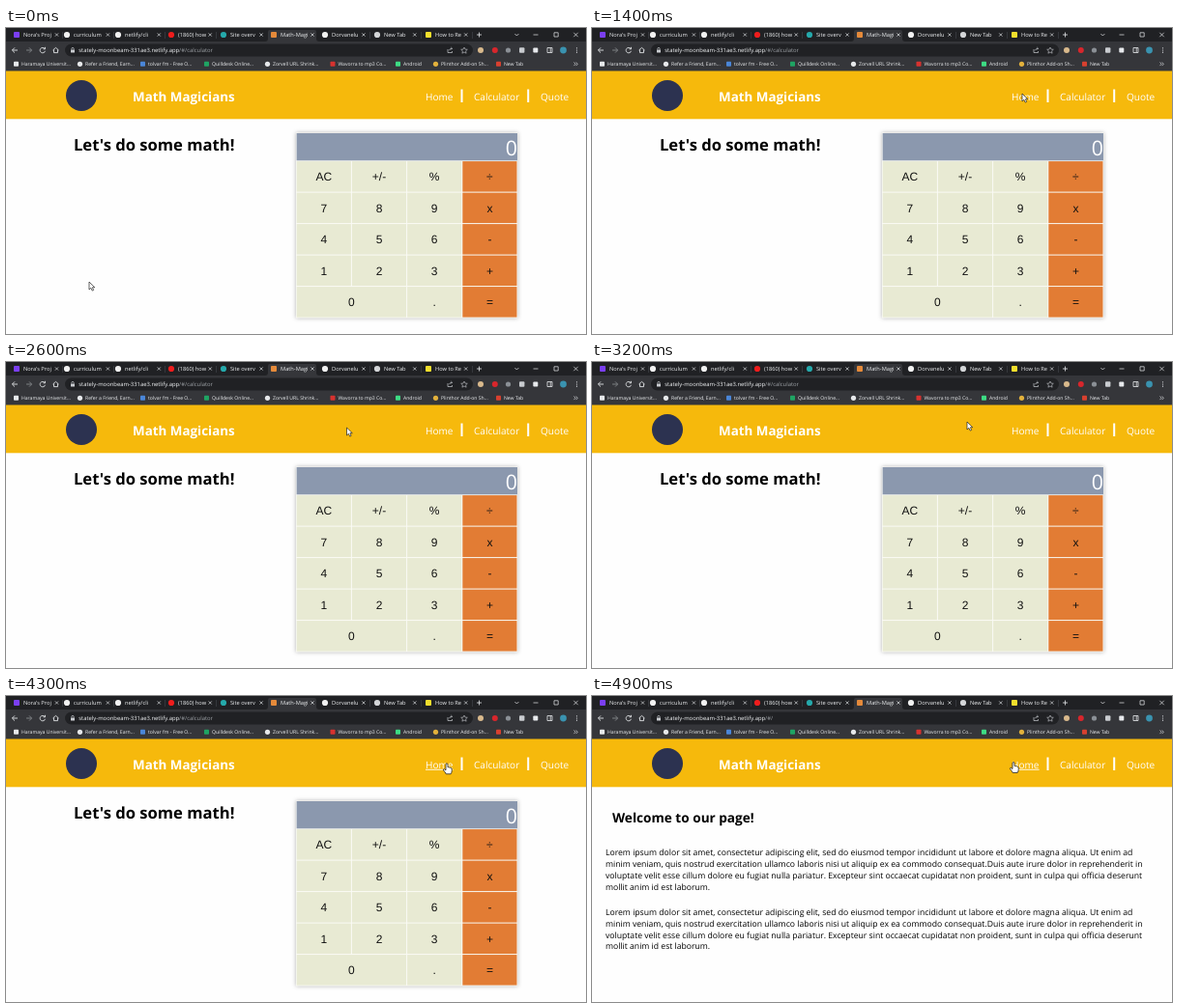
An HTML page that plays this animation: 600x317 px, repeating every 5000 ms.

```html
<!DOCTYPE html>
<html lang="en">
<head>
<meta charset="utf-8">
<title>Math Magicians</title>
<style>
  html, body { margin: 0; width: 100%; height: 100%; overflow: hidden; background: #fefefe; }
  svg { display: block; width: 600px; height: 317px; }
  text { font-family: "Open Sans", "Noto Sans", sans-serif; text-rendering: geometricPrecision; white-space: pre; }
  .arial { font-family: "Liberation Sans", Arial, sans-serif; }
  .pad { filter: drop-shadow(0 0 2px rgba(0, 0, 0, .3)); }
</style>
</head>
<body>
<svg id="stage" viewBox="0 0 600 317" xmlns="http://www.w3.org/2000/svg"></svg>
<script>
const stage = document.getElementById('stage');
const LOOP = 5000, STEP = 100;

function add(parent, tag, attrs, content) {
  const node = document.createElementNS('http://www.w3.org/2000/svg', tag);
  for (const key in attrs) node.setAttribute(key, attrs[key]);
  if (content !== undefined) node.textContent = content;
  parent.appendChild(node);
  return node;
}
const group = (parent = stage, attrs = {}) => add(parent, 'g', attrs);
const rect = (p, x, y, width, height, fill, rx = 0) => add(p, 'rect', { x, y, width, height, fill, rx });
const dot = (p, cx, cy, r, fill) => add(p, 'circle', { cx, cy, r, fill });
const line = (p, d, stroke, width = 0.9) =>
  add(p, 'path', { d, stroke, fill: 'none', 'stroke-width': width });
const label = (p, x, y, size, fill, str, more = {}) =>
  add(p, 'text', { x, y, 'font-size': size, fill, ...more }, str);
const show = (node, on) => node.setAttribute('visibility', on ? 'visible' : 'hidden');
const cross = (p, x, y, r, color) =>
  line(p, `M${x - r} ${y - r}l${2 * r} ${2 * r}m0 ${-2 * r}l${-2 * r} ${2 * r}`, color, 0.7);

// Browser window
function drawTabs(p) {
  rect(p, 0, 0, 600, 14, '#202124');
  add(p, 'path', { d: 'M268 14q3 0 3-3V4q0-2 2-2h46q2 0 2 2v7q0 3 3 3z', fill: '#35363a' });
  const tabs = [
    [18, "Nora's Proj", '#7b3ff2'], [70, 'curriculum', '#f2f2f2'], [123, 'netlify/cli', '#f2f2f2'],
    [178, '(1860) how', '#f01d1d'], [232, 'Site overv', '#25a9ab'], [284, 'Math-Magi', '#e58a3a'],
    [337, 'Dorvanelu', '#f2f2f2'], [391, 'New Tab', '#d4d6d8'], [444, 'How to Re', '#f3df2c']
  ];
  tabs.forEach(([x, title, color], i) => {
    if (i === 0 || i > 7 || i === 5) rect(p, x - 10, 4, 6, 6, color, 1);
    else dot(p, x - 7, 7, 3.1, color);
    label(p, x, 9.2, 5.7, '#eceef0', title);
    cross(p, 52.5 + i * 52.9, 7, 1.6, '#dfe1e4');
    if (i !== 4 && i !== 5) rect(p, 58 + i * 53, 4, 0.5, 7, '#4b4e54');
  });
  line(p, 'M487 7h5m-2.5-2.5v5', '#e8eaed', 0.8);
  line(p, 'M526.4 6l2 2 2-2M545.5 7h5M567 4.8h4.2v4.2H567z', '#e8eaed', 0.7);
  cross(p, 589.5, 7, 2.2, '#e8eaed');
}

function drawToolbar(p) {
  rect(p, 0, 14, 600, 31, '#35363a');
  rect(p, 61, 16.5, 422, 13, '#202124', 6.5);
  line(p, 'M12 23H6.5m2.5-2.6L6.4 23 9 25.6', '#dfe1e4');
  line(p, 'M21 23h5.5m-2.5-2.6l2.6 2.6L24 25.6', '#85888c');
  line(p, 'M40 21.4a2.7 2.7 0 1 0 .5 2.4M40.5 19.8v2h-2', '#dfe1e4');
  line(p, 'M48.5 23l3-2.6 3 2.6m-5-.6v3.2h4v-3.2', '#dfe1e4');
  rect(p, 67, 22.4, 4, 3.2, '#c9ccd0', 0.5);
  line(p, 'M67.8 22.6v-1a1.2 1.2 0 0 1 2.4 0v1', '#c9ccd0', 0.7);

  line(p, 'M457 22v3.5h4.5V24m-3-.8q.5-2 3-2l-1.2-1.2m1.2 1.2l-1.2 1.2', '#c9ccd0', 0.7);
  line(p, 'M474 20l1 2.1 2.3.2-1.7 1.6.5 2.3-2.1-1.2-2.1 1.2.5-2.3-1.7-1.6 2.3-.2z', '#c9ccd0', 0.6);
  dot(p, 491, 23, 3, '#d9b98c');
  dot(p, 505.8, 23, 3, '#d8262c');
  dot(p, 519.5, 23, 2.6, '#8b9096');
  rect(p, 531, 20.3, 5.4, 5.4, '#c9ccd0', 1);
  rect(p, 545.3, 20.6, 5, 5, '#e8eaed', 1);
  line(p, 'M560 20.5h5v5h-5zm3.2 0v5', '#e8eaed', 0.8);
  dot(p, 576.5, 23, 3.4, '#3a93b0');
  for (const y of [20.8, 23, 25.2]) dot(p, 590.5, y, 0.6, '#dfe1e4');
}

function drawBookmarks(p) {
  const marks = [
    [16, 'Haramaya Universit...', '#e6e8ea'], [82, 'Refer a Friend, Earn...', '#e6e8ea'],
    [147, 'tolvar fm - Free O...', '#4a86d8'], [213, 'Quilldesk Online...', '#1fa463'],
    [276, 'Zorvell URL Shrink...', '#e6e8ea'], [343.5, 'Wavorra to mp3 Co...', '#d8322f'],
    [411, 'Android', '#3ddc84'], [450, 'Plinthor Add-on Sh...', '#e2b13c'], [515, 'New Tab', '#d8402f']
  ];
  marks.forEach(([x, title, color], i) => {
    if (i % 3 === 1) dot(p, x - 5.5, 37.3, 2.6, color);
    else rect(p, x - 8, 34.8, 5, 5, color, 0.8);
    label(p, x, 39.2, 5.1, '#eceef0', title);
  });
  line(p, 'M587.5 35.5l1.6 1.8-1.6 1.8m2.2-3.6l1.6 1.8-1.6 1.8', '#dfe1e4', 0.7);
}

const chrome = group();
drawTabs(chrome);
drawToolbar(chrome);
drawBookmarks(chrome);
const url = label(chrome, 75.3, 25.3, 5.88, '#f2f4f6', 'stately-moonbeam-331ae3.netlify.app');
const route = add(url, 'tspan', { fill: '#9ca0a5' }, '/#/calculator');

// Site header
const header = group();
rect(header, 0, 44.5, 600, 49.8, '#f6b90c');
dot(header, 78, 70, 16, '#2c3250');
label(header, 131, 76, 13.4, '#fff', 'Math Magicians', { 'font-weight': 700 });
[[434, 'Home'], [484, 'Calculator'], [553, 'Quote']].forEach(([x, name]) =>
  label(header, x, 74.6, 10.05, '#fff', name));
for (const x of [470.5, 539.2]) rect(header, x, 63.5, 2, 13.5, '#fff');
const underline = rect(header, 434, 75.8, 28.6, 0.9, '#fff');

// Calculator page
const calc = group();
label(calc, 70, 127, 16.6, '#000', "Let's do some math!", { 'font-weight': 700 });
const pad = group(calc, { class: 'pad' });
rect(pad, 300, 108.5, 229.4, 192, '#fafaf5');
rect(pad, 300.6, 109, 228.4, 28.3, '#8b98ae');
label(calc, 529, 132, 21.3, '#fff', '0', { 'text-anchor': 'end' });

const CELL_W = 57.2, CELL_H = 32.5;
function key(col, row, span, name) {
  const x = 300.2 + col * CELL_W, y = 137.6 + row * CELL_H;
  rect(calc, x + 0.5, y + 0.5, span * CELL_W - 1, CELL_H - 1, col === 3 ? '#e27c34' : '#e8ead3');
  label(calc, x + span * CELL_W / 2, y + 20.4, 12, '#111', name, { 'text-anchor': 'middle', class: 'arial' });
}
['AC +/- % ÷', '7 8 9 x', '4 5 6 -', '1 2 3 +'].forEach((names, row) =>
  names.split(' ').forEach((name, col) => key(col, row, 1, name)));
key(0, 4, 2, '0');
key(2, 4, 1, '.');
key(3, 4, 1, '=');

// Home page
const home = group();
label(home, 21, 131, 13.6, '#000', 'Welcome to our page!', { 'font-weight': 700 });
const lorem = [
  'Lorem ipsum dolor sit amet, consectetur adipiscing elit, sed do eiusmod tempor incididunt ut labore et dolore magna aliqua. Ut enim ad',
  'minim veniam, quis nostrud exercitation ullamco laboris nisi ut aliquip ex ea commodo consequat.Duis aute irure dolor in reprehenderit in',
  'voluptate velit esse cillum dolore eu fugiat nulla pariatur. Excepteur sint occaecat cupidatat non proident, sunt in culpa qui officia deserunt',
  'mollit anim id est laborum.'
];
for (const top of [165, 226.8])
  lorem.forEach((str, i) => label(home, 14, top + i * 11.85, 8.65, '#000', str));

// Pointers, with the hot spot at 0,0
const pointer = group();
const arrow = add(pointer, 'path', {
  d: 'M0 0V8L1.9 6.3 3.2 9.1 4.6 8.5 3.4 5.7H5.8Z',
  fill: '#fff', stroke: '#222', 'stroke-width': 0.7, 'stroke-linejoin': 'round'
});
const hand = add(pointer, 'path', {
  d: 'M-1 .6Q0-.6 1 .6V4Q2 3.4 2.7 4.3 3.7 3.9 4.2 4.9 5.2 4.8 5.2 6V8Q5 9.5 4.2 11H-.8Q-1.5 9.2-3.4 7.2-4 6-2.8 5.8L-1 7Z',
  fill: '#fff', stroke: '#222', 'stroke-width': 0.8, 'stroke-linejoin': 'round'
});

const path = [
  [200, 86, 263], [900, 333, 137], [1400, 445, 68], [1800, 449.5, 69.5], [2200, 449.5, 69.5],
  [2300, 450, 70], [2400, 450, 70], [2600, 352.5, 68], [2700, 352.5, 68], [2900, 366, 66],
  [3000, 366, 66], [3200, 388, 62], [3600, 436, 66], [3900, 454, 70], [4000, 454, 70],
  [4100, 456, 69.8], [4700, 456, 69.8], [4900, 436, 68.5]
];
function position(t) {
  const i = path.findIndex(k => k[0] >= t);
  if (i === 0) return path[0].slice(1);
  if (i < 0) return path[path.length - 1].slice(1);
  const [t0, x0, y0] = path[i - 1], [t1, x1, y1] = path[i];
  const f = (t - t0) / (t1 - t0);
  return [x0 + (x1 - x0) * f, y0 + (y1 - y0) * f];
}

function render(now) {
  const t = Math.floor((now % LOOP) / STEP) * STEP;
  const hover = (t >= 1500 && t < 2500) || t >= 3700;
  const atHome = t >= 4400;
  const [x, y] = position(t);
  pointer.setAttribute('transform', `translate(${x} ${y})`);
  show(arrow, !hover);
  show(hand, hover);
  show(underline, hover);
  show(calc, !atHome);
  show(home, atHome);
  route.textContent = atHome ? '/#/' : '/#/calculator';
}

const start = performance.now();
function tick() {
  render(performance.now() - start);
  requestAnimationFrame(tick);
}
tick();
</script>
</body>
</html>
```
